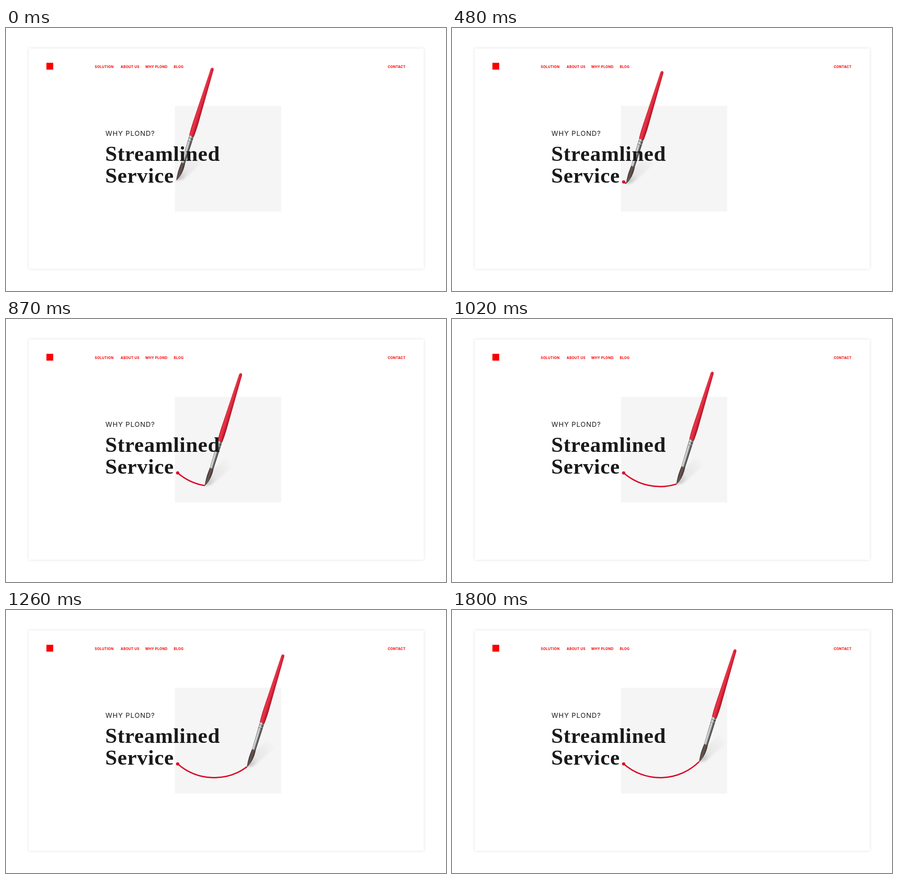
Recreate the animation shown at these times as an HTML page. Size 969x578 px, loop 2700 ms.

```html
<!DOCTYPE html>
<html lang="en">
<head>
<meta charset="utf-8">
<title>Streamlined Service</title>
<style>
  html, body { margin: 0; width: 100%; height: 100%; overflow: hidden; background: #fff; }
  svg { display: block; width: 969px; height: 578px; }
  .card { fill: #fff; filter: drop-shadow(0 0 3px rgba(0, 0, 0, .12)); }
  .nav { font: 700 7.5px Inter, sans-serif; letter-spacing: .3px; fill: #f80000; }
  .kicker { font: 400 15px Inter, sans-serif; letter-spacing: 1px; fill: #1a1a1a; }
  .title { font: 700 47px "Liberation Serif", serif; letter-spacing: .75px; fill: #1a1a1a; }
</style>
</head>
<body>
<svg viewBox="0 0 969 578">
  <defs>
    <linearGradient id="wood" gradientUnits="userSpaceOnUse" x1="-3.5" x2="9">
      <stop offset="0" stop-color="#c91d31"/>
      <stop offset=".3" stop-color="#ea384a"/>
      <stop offset=".62" stop-color="#d92338"/>
      <stop offset="1" stop-color="#9f1226"/>
    </linearGradient>
    <linearGradient id="metal" gradientUnits="userSpaceOnUse" x1="-2" x2="8">
      <stop offset="0" stop-color="#777"/>
      <stop offset=".28" stop-color="#e8e8e8"/>
      <stop offset=".5" stop-color="#a0a0a0"/>
      <stop offset=".75" stop-color="#484848"/>
      <stop offset="1" stop-color="#6c6c6c"/>
    </linearGradient>
    <linearGradient id="hair" gradientUnits="userSpaceOnUse" x1="-3" x2="8">
      <stop offset="0" stop-color="#3a2e2c"/>
      <stop offset=".45" stop-color="#65544f"/>
      <stop offset="1" stop-color="#352a28"/>
    </linearGradient>
    <linearGradient id="shade" gradientUnits="userSpaceOnUse" x1="0" y1="0" x2="60" y2="-55">
      <stop offset="0" stop-color="#000" stop-opacity=".24"/>
      <stop offset=".35" stop-color="#000" stop-opacity=".06"/>
      <stop offset="1" stop-color="#000" stop-opacity="0"/>
    </linearGradient>
    <filter id="soft" x="-30%" y="-30%" width="160%" height="160%">
      <feGaussianBlur stdDeviation="2.5"/>
    </filter>
  </defs>

  <rect class="card" x="50" y="45" width="870" height="484"/>
  <rect x="372" y="171" width="234" height="232" fill="#f5f5f5"/>
  <rect x="89" y="76.500" width="15" height="15" fill="#f80000"/>
  <g class="nav">
    <text x="195.500" y="87.500">SOLUTION</text>
    <text x="252.500" y="87.500">ABOUT US</text>
    <text x="306.500" y="87.500">WHY PLOND</text>
    <text x="369.500" y="87.500">BLOG</text>
    <text x="880" y="87.500" text-anchor="end">CONTACT</text>
  </g>

  <path id="stroke" fill="none" stroke="#dc0a28" stroke-width="3"/>
  <circle id="dot" cx="378" cy="338.300" fill="#dc0a28"/>

  <g id="brush">
    <path d="M0 0 L10 -28 L45 -62 L62 -44 L14 -3 Z" fill="url(#shade)" filter="url(#soft)"/>
    <g transform="rotate(17.2)">
      <path d="M-.5 0 C-2 -12 -3.500 -22 -1.300 -42.500 H7 C9 -26 6 -9 -.5 0 Z" fill="url(#hair)"/>
      <path d="M1 -7 Q0 -24 1.500 -41 M3 -9 Q4.500 -24 4.500 -41" fill="none" stroke="#89766f" stroke-width=".5" opacity=".6"/>
      <path d="M-1.500 -42 L-2.300 -105 H8 L7.200 -42 Q3 -40.500 -1.500 -42 Z" fill="url(#metal)"/>
      <path d="M-2.200 -92 Q3 -90.500 7.900 -92 M-2.300 -99 Q3 -97.500 8 -99" fill="none" stroke="#444" stroke-width="1" opacity=".65"/>
      <path d="M-2.200 -93.500 Q3 -92 7.900 -93.500 M-2.300 -100.500 Q3 -99 8 -100.500" fill="none" stroke="#fff" stroke-width="1" opacity=".6"/>
      <path d="M-2.700 -104 C-3.500 -114 -3.700 -128 -3.200 -142 L-.6 -257 Q-.2 -260.500 2.800 -260.500 Q5.900 -260.500 6.200 -257 L8.900 -142 C9.400 -128 9 -114 8.300 -104 Q3 -102.500 -2.700 -104 Z" fill="url(#wood)"/>
      <path d="M-.4 -255.500 Q2.800 -253.500 6.100 -255.500" fill="none" stroke="#8f1022" stroke-width=".8" opacity=".6"/>
    </g>
  </g>

  <text class="kicker" x="219" y="237">WHY PLOND?</text>
  <text class="title" x="218.500" y="291.500">Streamlined</text>
  <text class="title" x="218.500" y="339.500">Service</text>
</svg>
<script>
const [stroke, dot, brush] = ["stroke", "dot", "brush"].map(id => document.getElementById(id));
const LOOP = 2700, MOVE = 1800, STEP = 30;
const CX = 458, CY = 246, R = 122;
const FROM = -43.5, TO = 44.2, INK = -41;

const clamp = v => Math.min(1, Math.max(0, v));

// Cubic bezier easing (.77, 0, .27, 1), solved by bisection
function ease(x) {
  let lo = 0, hi = 1, u = .5;
  for (let i = 0; i < 24; i++) {
    u = (lo + hi) / 2;
    const v = 1 - u;
    if (3 * v * v * u * .77 + 3 * v * u * u * .27 + u ** 3 < x) lo = u;
    else hi = u;
  }
  return u * u * (3 - 2 * u);
}

// Point on the smile arc, angle in degrees from straight down
function arcPoint(deg) {
  const a = deg * Math.PI / 180;
  return [CX + R * Math.sin(a), CY + R * Math.cos(a)];
}

function draw(time) {
  const t = Math.floor(time % LOOP / STEP) * STEP;
  const angle = FROM + (TO - FROM) * ease(clamp(t / MOVE));
  const [x, y] = arcPoint(angle);
  brush.setAttribute("transform", `translate(${x + 1.3} ${y + 1})`);
  stroke.setAttribute("d", angle > INK
    ? `M${arcPoint(INK)} A${R} ${R} 0 0 0 ${x + 1},${y}` : "");
  dot.setAttribute("r", 3.5 * clamp((t - 240) / 210));
}

const start = performance.now();
function tick() {
  draw(performance.now() - start);
  requestAnimationFrame(tick);
}
tick();
</script>
</body>
</html>
```
